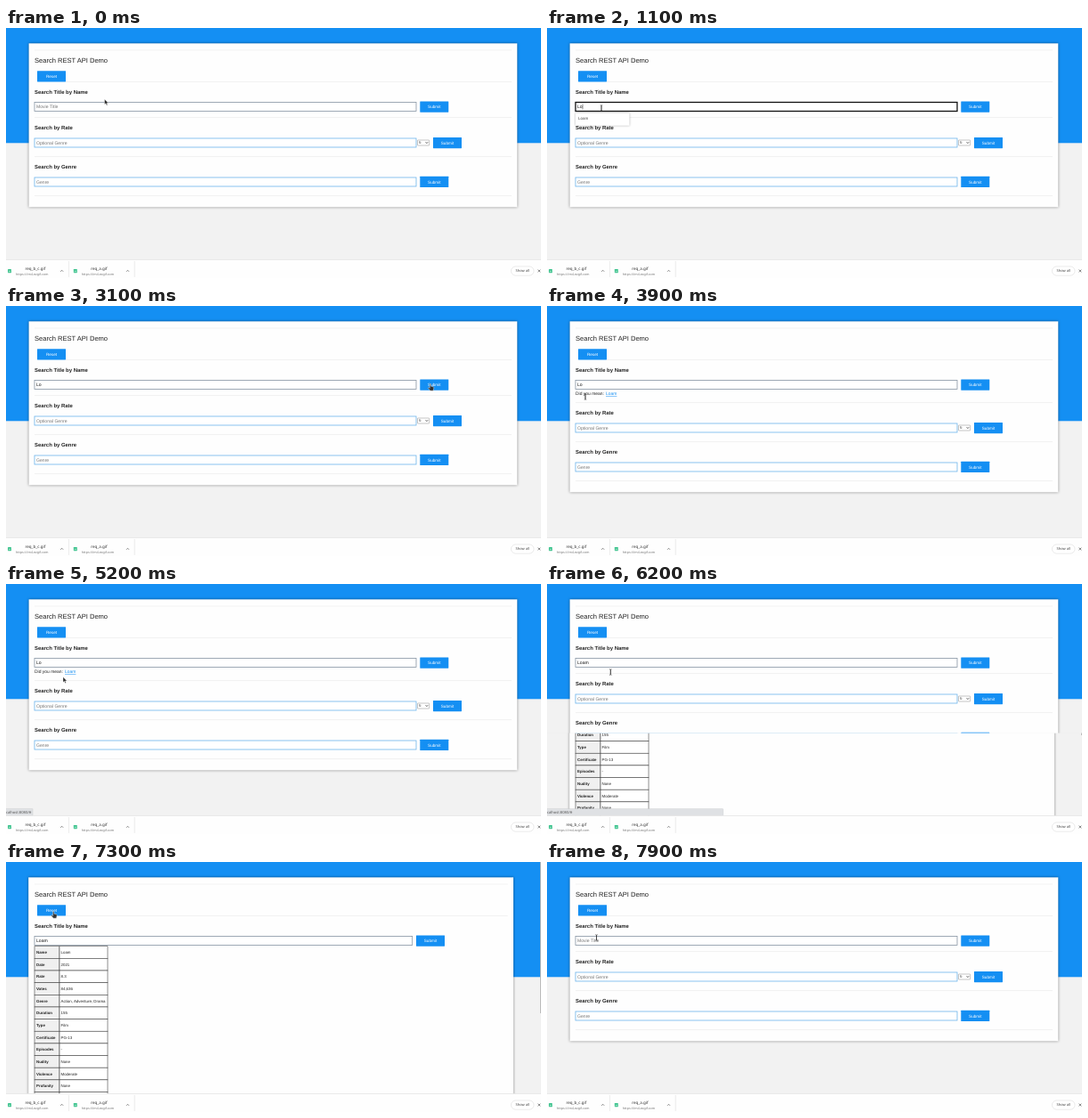
Recreate the animation shown at these times as an HTML page. Size 600 by 281 pixels, loop 8000 ms.

```html
<!DOCTYPE html>
<html lang="en">
<head>
<meta charset="utf-8">
<title>Search REST API Demo</title>
<style>
html, body { margin: 0; height: 100%; overflow: hidden; background: #f2f2f2; }
svg { display: block; }
#stage { width: 100vw; height: 100vh; font-family: "Liberation Sans", Arial, sans-serif; text-rendering: geometricPrecision; }
.bar { font-family: "Noto Sans", "Open Sans", sans-serif; }
.card { filter: drop-shadow(0 .5px 1.5px #0007); }
.list { filter: drop-shadow(0 .5px 1px #0005); }
</style>
</head>
<body>
<svg id="stage" viewBox="0 0 600 281" preserveAspectRatio="none"></svg>
<script>
const stage = document.getElementById('stage');
const LOOP = 8000, BLUE = '#148ff3', TITLE = 'Loam';

const rect = (x, y, w, h, fill, extra = '') =>
  `<rect x="${x}" y="${y}" width="${w}" height="${h}" fill="${fill}" ${extra}/>`;
const text = (x, cy, s, size, fill = '#222', extra = '') =>
  `<text x="${x}" y="${cy + size * .35}" font-size="${size}" fill="${fill}" ${extra}>${s}</text>`;
const line = (d, color, w = .6) => `<path d="${d}" fill="none" stroke="${color}" stroke-width="${w}"/>`;
const rule = (x, y, end) => line(`M${x} ${y}H${end}`, '#ececec', .7);
const heading = (y, s) => text(32, y, s, 5.93, '#222', 'font-weight="bold"');
const button = (x, y, s) => rect(x, y, 32, 12.3, BLUE, 'rx=".4"') +
  text(x + 16, y + 6.2, s, 4.65, '#fff', 'text-anchor="middle"');
const field = (y, right, border, s, color, w = .8) =>
  rect(32, y, right - 32, 10, '#fff', `stroke="${border}" stroke-width="${w}"`) + text(34, y + 5, s, 5.1, color);

const facts = [['Name', TITLE], ['Date', '2021'], ['Rate', '8.3'], ['Votes', '84,636'],
  ['Genre', 'Action, Adventure, Drama'], ['Duration', '155'], ['Type', 'Film'], ['Certificate', 'PG-13'],
  ['Episodes', '-'], ['Nudity', 'None'], ['Violence', 'Moderate'], ['Profanity', 'None'], ['', '']];

function table() {
  const top = 94.7, row = 13.65;
  return facts.map(([k, v], i) => {
    const y = top + i * row, edge = 'stroke="#444" stroke-width=".6"';
    return rect(32, y, 28, row, '#f0f0f0', edge) + rect(60, y, 54, row, '#fff', edge) +
      text(34, y + 6.9, k, 4.4, '#222', 'font-weight="bold"') + text(61.5, y + 6.9, v, 4.4);
  }).join('');
}

function suggestions(names) {
  const w = names.length > 3 ? 68 : 60.5;
  return rect(32, 95.5, w, 2.5 + 11.7 * names.length, '#fff', 'class="list"') +
    names.map((s, i) => text(35, 101.7 + 11.7 * i, s, 4.5, '#444')).join('');
}

function page({ value, focus, caret, mean, results }) {
  const shift = mean ? 8 : 0, trim = results ? 4.3 : 0;
  const left = results ? 25.2 : 25.6, right = 573.3 - trim, edge = 567 - trim;
  let s = rect(0, 0, 600, 281, '#f2f2f2') + rect(0, 0, 600, 129.3, BLUE) +
    rect(left, 17.3, right - left, results ? 270 : 184 + shift, '#fefefe', 'class="card"') +
    rule(32, 25, edge) + text(32, 36, 'Search REST API Demo', 7.55) +
    button(35, 48.2, 'Reset') + rule(67, 60.5, edge) + heading(71.7, 'Search Title by Name') +
    field(83.5, 460 - trim, focus ? '#111' : '#8795a3', value || (focus ? '' : 'Movie Title'),
      value ? '#111' : '#757575', focus ? 1.3 : .8) +
    button(464.3 - trim, 82.4, 'Submit');
  if (caret) s += line(`M${value ? 34.4 + 2.8 * value.length : 34.4} 85.7v5.8`, '#111', .5);
  if (results) return s + table() + rect(599, 0, 1, 260, '#f1f1f1') + rect(599, 0, 1, 170, '#bbb');
  if (mean) s += text(32, 98.5, 'Did you mean:', 4.96) +
    text(66, 98.5, TITLE, 4.96, BLUE, 'text-decoration="underline"');
  return s + `<g transform="translate(0 ${shift})">` + rule(32, 100.6, edge) +
    heading(112, 'Search by Rate') + field(124, 460, '#6db3ea', 'Optional Genre', '#757575') +
    rect(461.5, 126, 13.2, 6, '#fff', 'stroke="#888" stroke-width=".5" rx=".5"') +
    text(463, 129, '5-', 3.8) + line('M470.6 128.2l1.3 1.4l1.3-1.4', '#222', .7) +
    button(479, 122.9, 'Submit') + rule(32, 144.6, edge) +
    heading(156, 'Search by Genre') + field(168, 460, '#6db3ea', 'Genre', '#757575') +
    button(464.3, 166.8, 'Submit') + rule(32, 188.6, edge) + '</g>';
}

function downloads() {
  const item = (x, name) => rect(x + 2, 271, 4, 4.2, '#3fc48f', 'rx=".4"') +
    line(`M${x + 2.7} 274.3l1-1.2l.8 .7l.8-1`, '#fff', .5) +
    text(x + 21.5, 270, name, 4.5, '#333') + text(x + 11, 277.2, 'https://im4.ezgif.com', 3.65, '#777') +
    line(`M${x + 61.2} 273.8l1.5-1.5l1.5 1.5`, '#555', .7) +
    line(`M${x + 70.4} 262v18`, '#ddd');
  return '<g class="bar">' + rect(0, 260.3, 600, 21, '#fefefe') + line('M0 260.5H600', '#ddd') +
    item(0, 'req_b_c.gif') + item(73.8, 'req_a.gif') +
    rect(566.5, 268, 25.5, 10.2, '#fff', 'rx="5.1" stroke="#d5d5d5" stroke-width=".5"') +
    text(571.5, 273, 'Show all', 4, '#444') +
    line('M596.5 271.6l2.8 2.8m0-2.8l-2.8 2.8', '#555', .7) + '</g>';
}

const status = w => rect(-1, 252.8, w + 1, 7.6, '#dfe1e4', 'stroke="#c4c6c9" stroke-width=".4"') +
  `<g class="bar">${text(0, 256.6, 'calhost:8080/#', 4.1, '#555')}</g>`;

const shapes = {
  arrow: '<path d="M0 0v6l1.4-1.3l1 2.3l1-.4l-1-2.2h1.9z" fill="#222" stroke="#fff" stroke-width=".4"/>',
  beam: line('M-1.2-3.3q1.2 0 1.2 .8v5q0 .8-1.2 .8M1.2-3.3q-1.2 0-1.2 .8v5q0 .8 1.2 .8', '#222', .6),
  hand: '<path d="M-.7-3.2q.7-.8 1.3 0v2.4l2.6 .6q.8 .3 .6 1.4l-.6 3h-3.4l-2.4-3q.2-1 1.2-.4l.7 .6z" fill="#333" stroke="#fff" stroke-width=".4"/>'
};

// time, x, y, shape
const path = [
  [0, 110.5, 80, 'arrow'], [200, 88, 88, 'beam'], [400, 61, 90, 'beam'], [1600, 61, 90, 'beam'],
  [1900, 71, 88, 'beam'], [2000, 71, 88, 'beam'], [2700, 454, 87, 'beam'], [2800, 454, 87, 'beam'],
  [2900, 468, 89, 'hand'], [3100, 476, 91, 'hand'], [3200, 476, 91, 'hand'], [3300, 410, 97, 'arrow'],
  [3700, 101, 101, 'beam'], [3900, 43, 102, 'beam'], [4100, 68, 102, 'beam'], [4200, 68, 102, 'beam'],
  [4500, 102, 102, 'beam'], [4700, 82, 102, 'beam'], [4800, 82, 102, 'beam'], [4900, 73, 102, 'hand'],
  [5100, 64, 104.5, 'arrow'], [5200, 64, 104.5, 'arrow'], [5400, 88, 87, 'beam'],
  [5600, 76, 101, 'hand'], [5900, 72, 102, 'hand'], [6100, 71.3, 99, 'beam'], [6400, 71.3, 99, 'beam'],
  [6800, 99.3, 90, 'beam'], [7100, 66, 66, 'arrow'], [7200, 54, 59, 'hand'], [7500, 52, 59, 'hand'],
  [7600, 53, 66, 'arrow'], [7800, 55.5, 83, 'beam'], [7900, 55.5, 85, 'beam'], [LOOP, 55.5, 85, 'beam']
];

function cursor(t) {
  const i = path.findIndex(k => k[0] > t), [t0, x0, y0, shape] = path[i - 1], [t1, x1, y1] = path[i];
  const p = (t - t0) / (t1 - t0);
  return `<g transform="translate(${x0 + (x1 - x0) * p} ${y0 + (y1 - y0) * p})">${shapes[shape]}</g>`;
}

function draw(t) {
  const within = (a, b) => t >= a && t < b;
  const value = within(6100, 7500) ? TITLE : within(1100, 6100) ? TITLE.slice(0, 2) : within(900, 1100) ? TITLE[0] : '';
  const form = {
    value, focus: within(400, 3000), caret: within(400, 1700) || within(2200, 2700),
    mean: within(3300, 6100), results: within(6200, 7500)
  };
  let s = page(form);
  if (within(6200, 6300))
    s += `<svg width="600" height="167.6">${page({ value })}</svg>`;
  if (within(800, 2100)) {
    const names = [TITLE, 'Low Orchard', 'Lintel', 'Amber Sluice', 'Pale Ferry', 'Quillmoor'];
    s += suggestions(names.slice(0, t < 900 ? 6 : t < 1100 ? 3 : 1));
  }
  if (within(4900, 6500)) s += status(t < 6100 ? 30 : 197.5);
  stage.innerHTML = s + downloads() + cursor(t);
}

let last = -1;
function tick() {
  const t = Math.floor(performance.now() % LOOP / 100) * 100;
  if (t !== last) draw(last = t);
  requestAnimationFrame(tick);
}
tick();
</script>
</body>
</html>
```
